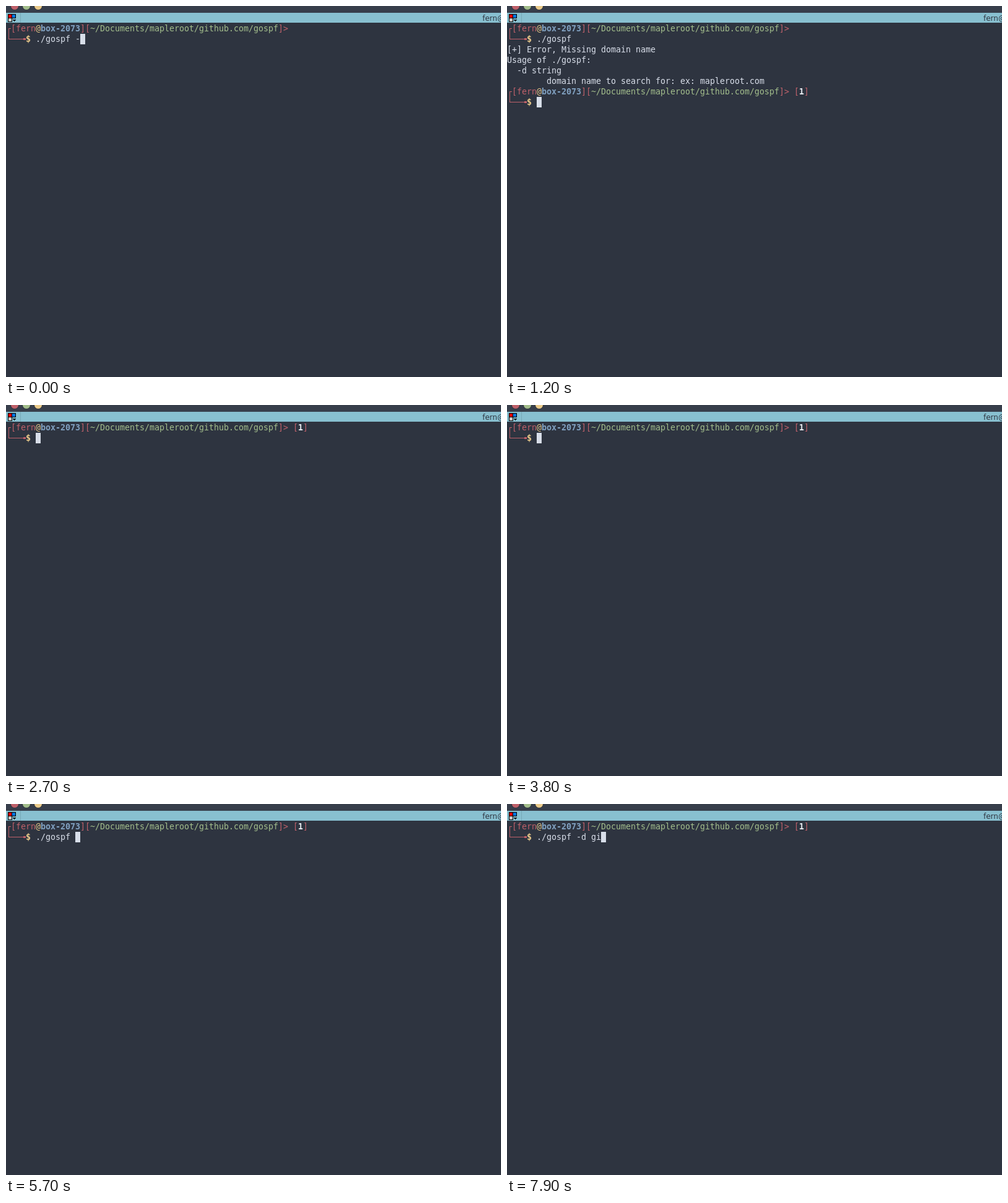
An HTML page with a canvas that plays this animation: 800 px wide and 600 px high, repeating every 8000 ms.

```html
<!DOCTYPE html>
<html lang="en">
<head>
<meta charset="utf-8">
<title>Terminal</title>
<style>
html, body { margin: 0; height: 100%; overflow: hidden; background: #2e3440; }
canvas { display: block; }
</style>
</head>
<body>
<canvas id="stage" width="800" height="600"></canvas>
<script>
const ctx = document.getElementById('stage').getContext('2d', { alpha: false });
const LOOP = 8000, CELL = 8, LINE = 17, TOP = 28;
const FG = '#d8dee9', BG = '#2e3440', RED = '#bf616a', GREEN = '#a3be8c',
      YELLOW = '#ebcb8b', BLUE = '#81a1c1', WHITE = '#eceff4';

const usage = [
  '[+] Error, Missing domain name',
  'Usage of ./gospf:',
  '  -d string',
  '        domain name to search for: ex: mapleroot.com'
];

// Each step: start time, screen, command text, cursor visible
const steps = [
  [0, 'first', './gospf -', 1],
  [500, 'first', './gospf ', 1],
  [1200, 'usage', '', 1],
  [1700, 'usage', '', 0],
  [2300, 'usage', '', 1],
  [2700, 'clear', '', 1],
  [3200, 'clear', '', 0],
  [3800, 'clear', '', 1],
  [4400, 'clear', '', 0],
  [4800, 'clear', '', 1],
  [4900, 'clear', '.', 1],
  [5100, 'clear', './', 1],
  [5400, 'clear', './g', 1],
  [5500, 'clear', './go', 1],
  [5700, 'clear', './gospf ', 1],
  [6200, 'clear', './gospf ', 0],
  [6800, 'clear', './gospf ', 1],
  [6900, 'clear', './gospf -', 1],
  [7000, 'clear', './gospf -d', 1],
  [7200, 'clear', './gospf -d ', 1],
  [7800, 'clear', './gospf -d g', 1],
  [7900, 'clear', './gospf -d gi', 1]
];

function rect(x, y, w, h, color) {
  ctx.fillStyle = color;
  ctx.fillRect(x, y, w, h);
}

// Writes text on the character grid and returns the next column
function write(col, row, text, color = FG, bold = false) {
  ctx.font = (bold ? 'bold ' : '') + '13.333px "DejaVu Sans Mono", monospace';
  ctx.fillStyle = color;
  for (const ch of text) ctx.fillText(ch, CELL * col++, TOP + LINE * row + 13);
  return col;
}

function prompt(row, failed) {
  const y = TOP + LINE * row + 8;
  rect(4, y, 4, 1, RED);
  rect(4, y, 1, LINE + 1, RED);
  rect(4, y + LINE, 28, 1, RED);
  rect(28, y + LINE - 1, 4, 3, RED);
  let col = write(1, row, '[fern', RED);
  col = write(col, row, '@', YELLOW);
  col = write(col, row, 'box-2073', BLUE, true);
  col = write(col, row, '][', RED);
  col = write(col, row, '~/Documents/mapleroot/github.com/gospf', GREEN);
  col = write(col, row, ']> ', RED);
  if (failed) {
    col = write(col, row, '[', RED);
    col = write(col, row, '1', WHITE, true);
    write(col, row, ']', RED);
  }
  write(4, row + 1, '$', YELLOW, true);
}

function command(row, text, cursor) {
  const col = write(6, row, text);
  if (cursor) rect(col * CELL, TOP + LINE * row, CELL, LINE, FG);
}

function windowBar() {
  rect(0, 0, 800, 11, '#373e4b');
  [RED, GREEN, YELLOW].forEach((color, i) => {
    ctx.beginPath();
    ctx.arc(14 + 19 * i, 0, 6.5, 0, 7);
    ctx.fillStyle = color;
    ctx.fill();
    ctx.strokeStyle = '#2b303b';
    ctx.stroke();
  });
  rect(0, 11, 800, 16, '#88c0d0');
  rect(23, 11, 1, 16, '#76a9b8');

  // Pane grouping button
  rect(3, 13, 13, 7, '#000');
  rect(3, 19, 7, 7, '#000');
  rect(4, 14, 5, 5, '#e00000');
  rect(10, 14, 5, 5, '#0078e0');
  rect(4, 20, 5, 5, '#c8c8c8');
  for (let i = 0; i < 3; i++) rect(11 + i, 22 + i, 5 - 2 * i, 1, '#000');

  ctx.font = '12px "DejaVu Sans", sans-serif';
  ctx.fillStyle = BG;
  ctx.fillText('fern@box-2073', 770, 24);
}

function draw(now) {
  const t = now % LOOP;
  const [, screen, text, cursor] = steps.findLast(step => step[0] <= t);
  rect(0, 0, 800, 600, BG);
  windowBar();
  if (screen === 'usage') {
    prompt(0, false);
    command(1, './gospf ', false);
    usage.forEach((line, i) => write(0, 2 + i, line));
    prompt(6, true);
    command(7, text, cursor);
  } else {
    prompt(0, screen === 'clear');
    command(1, text, cursor);
  }
}

function tick() {
  draw(performance.now());
  requestAnimationFrame(tick);
}
tick();
</script>
</body>
</html>
```
